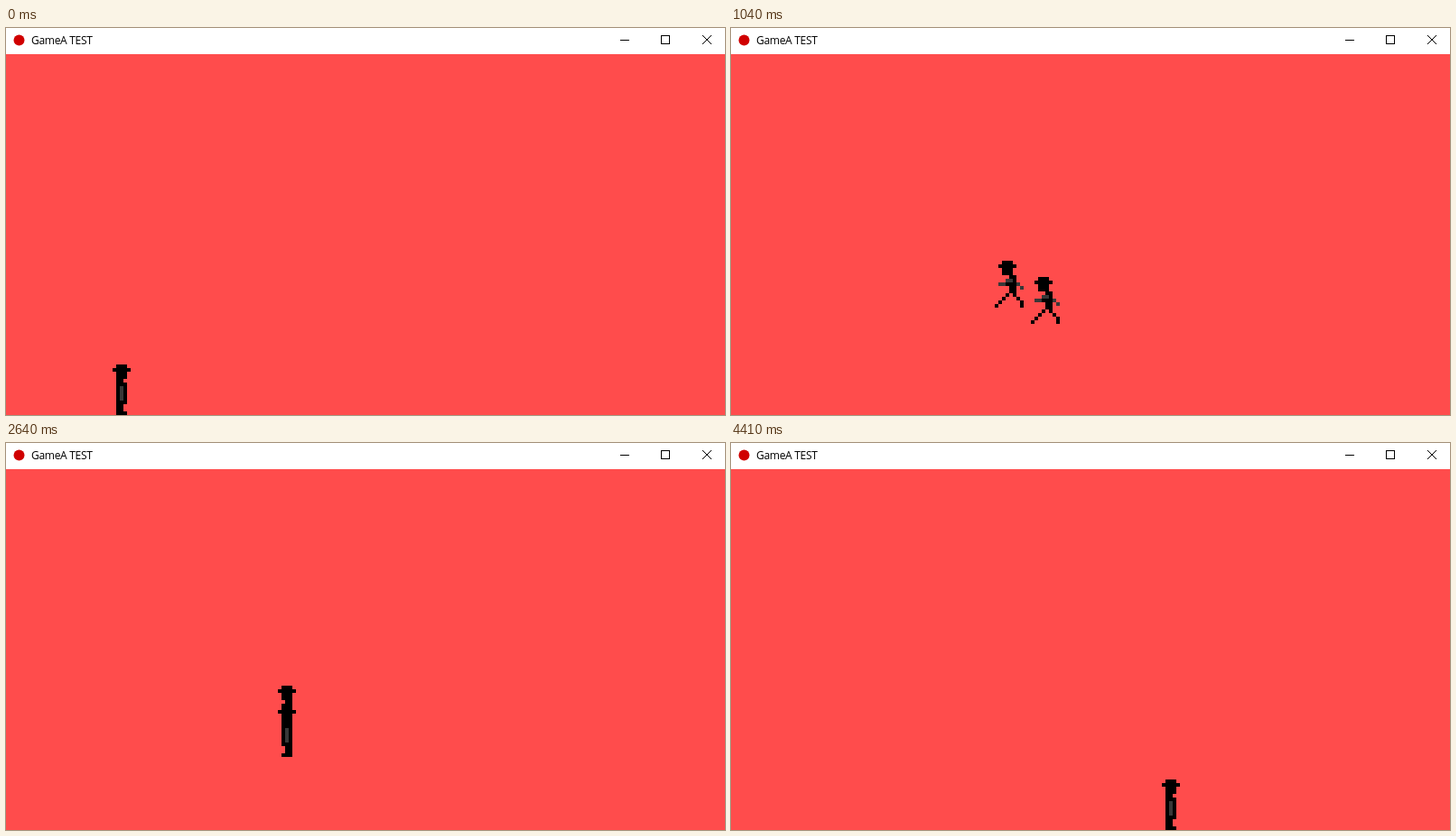
Recreate the animation shown at these times as an HTML page with a canvas. Size 796 by 429 pixels, loop 4670 ms.

```html
<!DOCTYPE html>
<html lang="en">
<head>
<meta charset="utf-8">
<title>GameA TEST</title>
<style>
  html, body { margin: 0; width: 100%; height: 100%; overflow: hidden; background: #ff4c4c; }
  svg, canvas { position: absolute; left: 0; top: 0; display: block; }
  text { font: 12px "Open Sans", "Noto Sans", sans-serif; letter-spacing: -.3px; }
</style>
</head>
<body>
<canvas id="stage" width="796" height="429"></canvas>
<svg width="796" height="29" viewBox="0 0 796 29">
  <rect width="796" height="29" fill="#fff"/>
  <circle cx="14.5" cy="13.5" r="6" fill="#d00000"/>
  <text x="28" y="18">GameA TEST</text>
  <g fill="none" stroke="#000">
    <path d="M680 13.5h10" shape-rendering="crispEdges"/>
    <rect x="725.5" y="8.5" width="9" height="9" shape-rendering="crispEdges"/>
    <path d="M771 8l10 10M781 8l-10 10"/>
  </g>
</svg>
<script>
const ctx = document.getElementById("stage").getContext("2d");
const LOOP = 4670, LAG = 76, CELL = 4;
const START_X = 128, SPEED = 0.5355, STRIDE = 130;
const GROUND = 373, JUMP = 127, RISE = 440, FALL = 526;

// Walks at constant speed: when each one starts and where it stops.
const walks = [
  { at: 56, to: 462 },
  { at: 748, to: 126 },
  { at: 1473.5, to: 458 },
  { at: 2148, to: 311 },
  { at: 3405, to: 487 }
];
const launches = [737, 2388, 3368];

function walk(t) {
  let x = START_X, face = 1, moving = false;
  for (const { at, to } of walks) {
    if (t < at) break;
    const step = (t - at) * SPEED, gap = to - x;
    face = Math.sign(gap);
    moving = step < Math.abs(gap);
    x = moving ? x + face * step : to;
  }
  return { x, face, moving };
}

// A parabola whose falling speed stops growing after "cap".
function height(t) {
  const launch = launches.find(at => t >= at && t < at + RISE + FALL);
  if (launch === undefined) return 0;
  const d = t - launch - RISE;
  const cap = FALL - Math.sqrt(FALL ** 2 - RISE ** 2);
  const drop = d < cap ? d * d : cap * (2 * d - cap);
  return JUMP * (1 - drop / RISE ** 2);
}

// Poses face right, in cells; the head's left column is 0.
function box(x, y, w = 1, h = 1) {
  ctx.fillRect(x, y, w, h);
}

function ink(color) {
  ctx.fillStyle = color;
}

const black = () => ink("#000");
const gray = () => ink("#383838");

function head(y) {
  black();
  box(0, y, 3, 4);
  box(-1, y + 1, 5);
}

function idle() {
  head(0);
  box(0, 4, 2, 10);
  box(2, 5, 1, 6);
  box(2, 13);
  gray();
  box(1, 6, 1, 4);
}

function stride() {
  head(0);
  box(-1, 4, 2, 5);
  box(1, 6);
  for (let i = 0; i < 4; i++) {
    box(1 + i, 9 + i);
    box(Math.max(-1 - i, -3), 9 + i);
  }
  gray();
  box(0, 5, 2);
  box(-2, 6);
  box(2, 6, 2);
  box(-3, 7);
}

function pass() {
  head(1);
  box(0, 5, 2, 9);
  box(2, 6, 1, 7);
  box(3, 13);
  ctx.clearRect(2, 10, 1, 1);
  ctx.clearRect(1, 11, 1, 2);
  gray();
  box(1, 7);
  box(-1, 8, 1, 2);
  box(2, 8);
  box(3, 9);
}

function drawHero(t) {
  const { x, face, moving } = walk(t);
  const h = height(t);
  const wide = h > 0 || Math.floor((t - 53) / STRIDE) % 2 === 0;
  ctx.save();
  ctx.translate(Math.round(x), Math.round(GROUND - h));
  ctx.scale(face * CELL, CELL);
  ctx.translate(-1.5, 0);
  (!moving ? idle : wide ? stride : pass)();
  ctx.restore();
}

// The picture holds between ticks: 50 ms each with one short tick
// in every block of 280 ms, then an even beat for the last stretch.
function hold(t) {
  const first = 70, block = 280, even = 3690, beat = 48;
  if (t < first) return 0;
  if (t >= even) return t - (t - even) % beat;
  const r = (t - first) % block;
  return t - (r < 130 ? r : r - 130) % 50;
}

function draw(time) {
  const t = hold(time % LOOP);
  ctx.clearRect(0, 0, 796, 429);
  drawHero(t);
  drawHero(t - LAG);
}

let start;
function frame(now) {
  start ??= now;
  draw(Math.max(0, now - start));
  requestAnimationFrame(frame);
}
draw(0);
requestAnimationFrame(frame);
</script>
</body>
</html>
```
